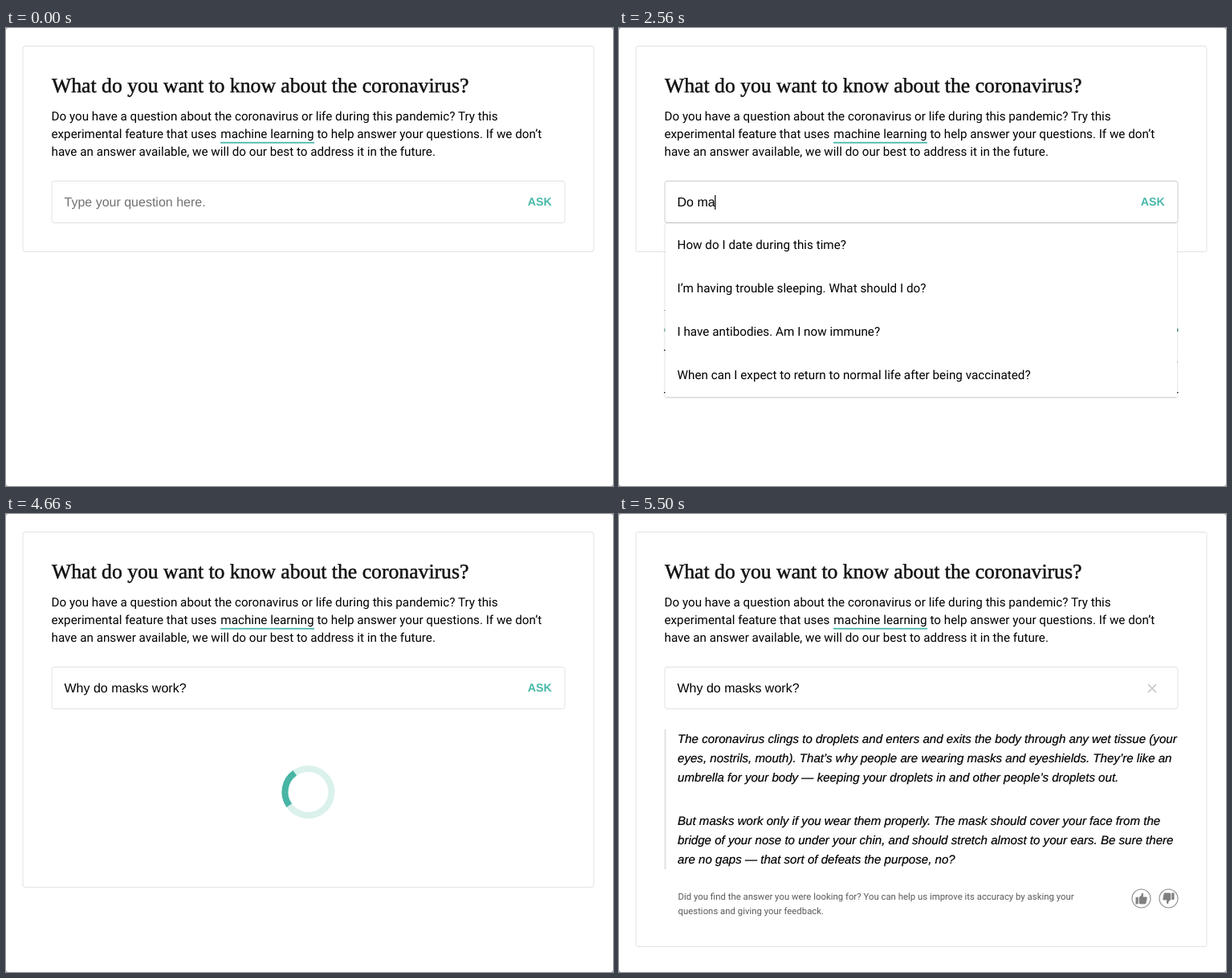
An HTML page that plays this animation: 756 by 570 pixels, repeating every 8 s.

```html
<!DOCTYPE html>
<html lang="en">
<head>
<meta charset="utf-8">
<title>Question box</title>
<style>
html, body { margin: 0; width: 100%; height: 100%; overflow: hidden; background: #fff; }
svg { display: block; }
text { font: 15.22px Roboto, Arial, sans-serif; fill: #000; white-space: pre; text-rendering: geometricPrecision; }
.title { font: 25.7px "Liberation Serif", "Times New Roman", serif; fill: #121212; stroke: #121212; stroke-width: .5px; }
.field, .ask { font: 16px "Liberation Sans", Arial, sans-serif; }
.hint { fill: #727272; }
.ask { font-size: 14.2px; font-weight: bold; fill: #46b8a8; }
.options text { font-size: 15.28px; }
.answer text { font: italic 15.1px "Liberation Sans", Arial, sans-serif; stroke: #000; stroke-width: .2px; }
.answer .small { font: 11.39px Roboto, Arial, sans-serif; fill: #5a5a5a; stroke: none; }
.box { fill: #fff; stroke: #e2e2e2; }
.menu { fill: #fff; filter: drop-shadow(0 1px 1px rgba(0, 0, 0, .22)); }
.ring circle { fill: none; stroke: #daf1ec; }
.ring .arc { stroke: #48b5a5; }
</style>
</head>
<body>
<svg width="756" height="570" viewBox="0 0 756 570">
  <rect width="756" height="570" fill="#999"/>
  <rect width="756" height="570" rx="3" fill="#fff"/>
  <rect id="card" class="box" x="21" y="22.5" width="711" height="256" rx="3"/>
  <text class="title" x="57" y="80">What do you want to know about the coronavirus?</text>
  <text x="56.5" y="115">Do you have a question about the coronavirus or life during this pandemic? Try this</text>
  <text y="137"><tspan x="56.5">experimental feature that uses</tspan><tspan x="267.3">machine learning</tspan><tspan x="387.5">to help answer your questions. If we don’t</tspan></text>
  <rect x="267" y="141.8" width="117" height="1.8" fill="#46b8a8"/>
  <text x="56.5" y="159">have an answer available, we will do our best to address it in the future.</text>

  <g id="menu">
    <g fill="#999">
      <rect x="56" y="351" width="2" height="1"/>
      <rect x="56" y="374" width="2" height="4" fill="#8cbcb4"/>
      <rect x="694" y="374" width="2.5" height="4" fill="#559a8f"/>
      <rect x="56" y="400" width="2" height="2" fill="#555"/>
      <rect x="694" y="414" width="2" height="3" fill="#ddd"/>
      <rect x="56" y="453" width="640.5" height="1.3" fill="#111"/>
    </g>
    <rect class="menu" x="57.5" y="242" width="637.5" height="217"/>
    <g class="options">
      <text x="72.5" y="275">How do I date during this time?</text>
      <text x="72.5" y="329">I’m having trouble sleeping. What should I do?</text>
      <text x="72.5" y="383">I have antibodies. Am I now immune?</text>
      <text x="72.5" y="437">When can I expect to return to normal life after being vaccinated?</text>
    </g>
  </g>

  <rect id="input" class="box" x="57" y="190.5" width="639" height="52" rx="3"/>
  <path id="edge" d="M59 242.5H694" stroke="#bdbdbd"/>
  <text id="field" class="field" x="72.5" y="222"></text>
  <rect id="caret" y="208" width="1.2" height="18"/>
  <text id="ask" class="ask" x="649.7" y="221">ASK</text>

  <g id="smallRing" class="ring" stroke-width="3"><circle r="13.5"/><circle class="arc" r="13.5" pathLength="8" stroke-dasharray="2 6" stroke-dashoffset="-5"/></g>
  <g id="bigRing" class="ring" stroke-width="8"><circle r="29"/><circle class="arc" r="29" pathLength="8" stroke-dasharray="2 6" stroke-dashoffset="-5"/></g>

  <g id="answer" class="answer">
    <path d="M659 212l10 10m0-10l-10 10" stroke="#c4c4c4" stroke-width="1.6"/>
    <rect x="56.5" y="268" width="2" height="174" fill="#e2e2e2"/>
    <text x="73" y="285">The coronavirus clings to droplets and enters and exits the body through any wet tissue (your</text>
    <text x="73" y="309">eyes, nostrils, mouth). That’s why people are wearing masks and eyeshields. They’re like an</text>
    <text x="73" y="333">umbrella for your body — keeping your droplets in and other people’s droplets out.</text>
    <text x="73" y="387">But masks work only if you wear them properly. The mask should cover your face from the</text>
    <text x="73" y="411">bridge of your nose to under your chin, and should stretch almost to your ears. Be sure there</text>
    <text x="73" y="435">are no gaps — that sort of defeats the purpose, no?</text>
    <text class="small" x="73.5" y="479.5">Did you find the answer you were looking for? You can help us improve its accuracy by asking your</text>
    <text class="small" x="73.5" y="497.5">questions and giving your feedback.</text>
    <defs>
      <g id="thumb">
        <circle r="11.5" fill="#fff" stroke="#8a8a8a" stroke-width="1.1"/>
        <path d="M-7-1.5h3.2v8.5h-3.2zM-2.8-1.2L.2-4.2V-6.5q1.8-.8 2.4 1.2L2.2-2H6.2q1.3.3 1 1.6L6 5.6Q5.6 7 4.4 7H-1l-1.8-.8z" fill="#808080"/>
      </g>
    </defs>
    <use href="#thumb" x="650.5" y="478.5"/>
    <use href="#thumb" transform="translate(684.5 478.5) rotate(180)"/>
  </g>
</svg>
<script>
const LOOP = 8000, FOCUS = 1000, SUBMIT = 3960, SPIN = 4170, LOADING = 4185, ANSWER = 5500;
const QUESTION = 'Do masks work?';
const KEYS = [2000, 2070, 2210, 2490, 2560, 2700, 2770, 2840, 2980, 3120, 3190, 3260, 3400, 3610];
const el = id => document.getElementById(id);
const show = (id, on) => { el(id).style.display = on ? '' : 'none'; };

// cubic-bezier(.25, .1, .25, 1), solved by bisection
function ease(x) {
  const curve = (a, b, u) => 3 * a * u * (1 - u) ** 2 + 3 * b * u * u * (1 - u) + u ** 3;
  let lo = 0, hi = 1;
  for (let i = 0; i < 20; i++) {
    const mid = (lo + hi) / 2;
    if (curve(.25, .25, mid) < x) lo = mid; else hi = mid;
  }
  return curve(.1, 1, lo);
}

function turn(id, x, y, elapsed) {
  const angle = 360 * ease(Math.max(0, elapsed) % 1000 / 1000);
  el(id).setAttribute('transform', `translate(${x} ${y}) rotate(${angle})`);
}

function draw(t) {
  const focused = t >= FOCUS && t < LOADING;
  const typed = QUESTION.slice(0, KEYS.filter(k => k <= t).length);
  const field = el('field');
  field.textContent = t >= LOADING ? 'Why do masks work?' : typed || 'Type your question here.';
  field.classList.toggle('hint', !typed);

  show('menu', focused);
  show('edge', focused);
  el('input').style.stroke = focused ? '#cccccc' : '';
  show('caret', focused && t < SUBMIT);
  el('caret').setAttribute('x', 72.5 + (typed ? field.getComputedTextLength() - .4 : 0));

  const fade = t < LOADING ? Math.min(1, Math.max(0, (t - SUBMIT) / 180)) : 0;
  el('ask').style.opacity = 1 - fade;
  show('ask', t < ANSWER);
  el('smallRing').style.opacity = fade;
  turn('smallRing', 665, 216, t - SPIN);
  show('bigRing', t >= LOADING && t < ANSWER);
  turn('bigRing', 376.4, 346, t - LOADING);

  show('answer', t >= ANSWER);
  el('card').setAttribute('height', t < LOADING ? 256 : t < ANSWER ? 442 : 516);
}

const start = performance.now();
function tick() {
  draw((performance.now() - start) % LOOP);
  requestAnimationFrame(tick);
}
tick();
</script>
</body>
</html>
```
